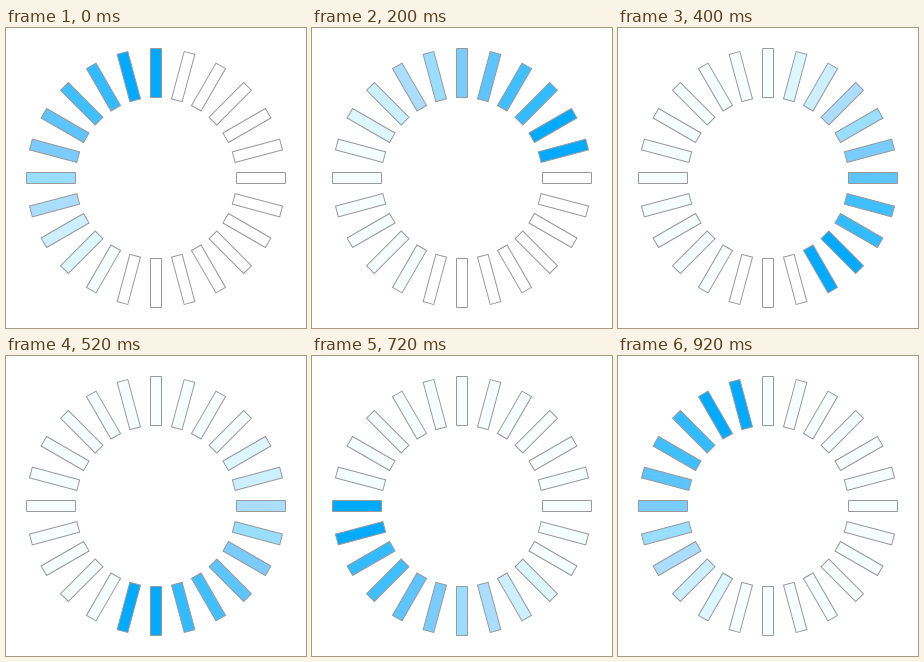
Recreate the animation shown at these times as an HTML page with a canvas. Size 300 by 300 pixels, loop 960 ms.

```html
<!DOCTYPE html>
<html lang="en">
<head>
<meta charset="utf-8">
<title>Spinner</title>
<style>
  html, body { margin: 0; width: 100%; height: 100%; overflow: hidden; background: #fff; }
  canvas { display: block; }
</style>
</head>
<body>
<canvas id="stage" width="300" height="300"></canvas>
<script>
const ctx = document.getElementById('stage').getContext('2d');
const BARS = 24, STEP = 40;
const TAIL = ['#00aaff', '#00aaff', '#33bbff', '#40bfff', '#5cc4ff', '#7accff',
              '#99ddff', '#aaddff', '#ccf0ff', '#ddf6ff'];
const FADED = '#f5ffff', FRESH = '#ffffff';
const FIRST_FADED = 14; // bars from here on are already tinted when the loop starts

function barColor(bar, head) {
  const lag = (head - bar + BARS) % BARS;
  if (lag < TAIL.length) return TAIL[lag];
  return bar > head && bar < FIRST_FADED ? FRESH : FADED;
}

function draw(now) {
  const head = Math.floor(now / STEP) % BARS;
  ctx.clearRect(0, 0, 300, 300);
  ctx.strokeStyle = '#999';
  for (let bar = 0; bar < BARS; bar++) {
    ctx.save();
    ctx.translate(150, 150);
    ctx.rotate(bar * 2 * Math.PI / BARS);
    ctx.beginPath();
    ctx.rect(-5.5, -129.5, 11, 49);
    ctx.fillStyle = barColor(bar, head);
    ctx.fill();
    ctx.stroke();
    ctx.restore();
  }
}

const start = performance.now();
function tick() {
  draw(performance.now() - start);
  requestAnimationFrame(tick);
}
tick();
</script>
</body>
</html>
```
